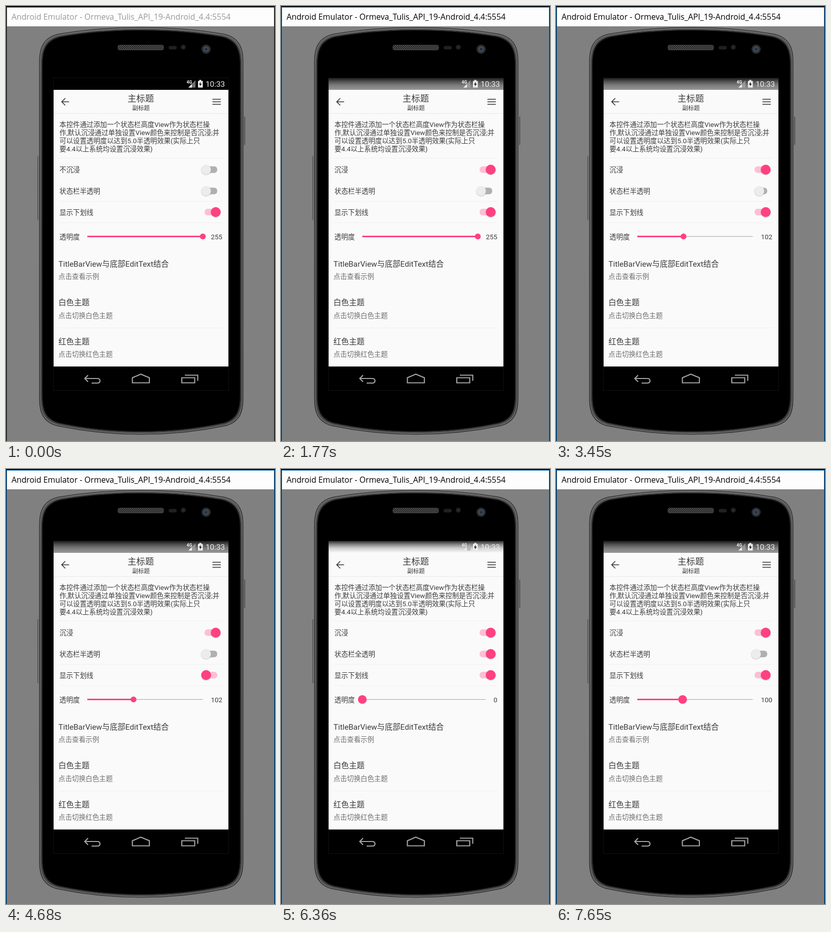
These frames come from a looping animation (531x856 px, 8 s). An HTML page:

```html
<!DOCTYPE html>
<html lang="zh-CN">
<head>
<meta charset="utf-8">
<style>
html, body { margin: 0; width: 100%; height: 100%; overflow: hidden; background: #808080; }
svg { display: block; width: 531px; height: 856px; }
text { font: 13.4px Roboto, 'Noto Sans CJK SC', 'Noto Sans CJK', sans-serif; fill: #3c3c3c; }
text.caption { font: 15.8px 'Open Sans', 'Noto Sans', sans-serif; }
text.item { font-size: 15.35px; fill: #3a3a3a; }
text.hint { fill: #707070; }
text.clock { font-size: 15.3px; fill: #eee; }
text.net { font-size: 8.5px; font-weight: 700; fill: #eee; }
text.mid { text-anchor: middle; }
text.end { text-anchor: end; }
</style>
</head>
<body>
<svg viewBox="0 0 531 856">
  <defs>
    <linearGradient id="shade" x1="0" y1="0" x2="0" y2="1">
      <stop offset="0" stop-opacity=".8"/>
      <stop offset=".3" stop-opacity=".45"/>
      <stop offset=".6" stop-opacity=".18"/>
      <stop offset="1" stop-opacity="0"/>
    </linearGradient>
    <linearGradient id="rim" x1="0" y1="0" x2="0" y2="1">
      <stop offset="0" stop-color="#5a5a5a"/>
      <stop offset=".12" stop-color="#444"/>
      <stop offset=".9" stop-color="#3c3c3c"/>
      <stop offset="1" stop-color="#4c4c4c"/>
    </linearGradient>
    <linearGradient id="key">
      <stop offset="0" stop-color="#3a3a3a"/>
      <stop offset=".45" stop-color="#8a8a8a"/>
      <stop offset="1" stop-color="#333"/>
    </linearGradient>
    <pattern id="mesh" width="4" height="4" patternUnits="userSpaceOnUse">
      <rect width="4" height="4" fill="#1c1c1c"/>
      <path d="M0 0L4 4M4 0L0 4" stroke="#666" stroke-width=".8"/>
    </pattern>
    <path id="body" d="M66 110C66 84 72 62 104 55Q180 42 267 42T430 55C462 62 468 84 468 110V770C468 796 464 818 434 826Q354 843 267 843T100 826C70 818 66 796 66 770Z"/>
  </defs>

  <rect width="531" height="856" fill="#0c0c0c"/>
  <rect x="1" y="2" width="529" height="854" fill="#808080"/>
  <rect x="1" y="2" width="529" height="38" fill="#fdfdfd"/>
  <path id="frame" d="M1.500 856V2.500H529.500V856" fill="none"/>
  <text id="caption" class="caption" x="11" y="27">Android Emulator - Ormeva_Tulis_API_19-Android_4.4:5554</text>

  <g id="phone">
    <rect x="62" y="295" width="5" height="127" rx="2" fill="url(#key)"/>
    <rect x="467" y="217" width="5" height="57" rx="2" fill="url(#key)"/>
    <use href="#body" fill="url(#rim)" stroke="#2a2a2a"/>
    <g id="layers"></g>
    <rect x="221" y="77" width="90" height="9.500" rx="3" fill="url(#mesh)" stroke="#484848"/>
    <rect x="321" y="78.500" width="16" height="7" rx="3.500" fill="#202020"/>
    <circle cx="350" cy="81" r="5" fill="#1e1e1e"/>
    <circle cx="350" cy="81" r="2.500" fill="#2b2b2b"/>
    <circle cx="395" cy="85" r="9" fill="#2c3034"/>
    <circle cx="395" cy="85" r="5.500" fill="#3e4a57"/>
    <circle cx="395" cy="85" r="2.500" fill="#222a35"/>
    <rect x="93.500" y="141.500" width="346" height="615" fill="#000" stroke="#111"/>
  </g>

  <rect x="94" y="142" width="345" height="567.400" fill="#fafafa"/>
  <rect id="tint" x="94" y="142" width="345" height="23"/>
  <rect id="fade" x="94" y="142" width="345" height="23" fill="url(#shade)"/>
  <text class="net" x="356.500" y="153">4G</text>
  <path d="M374 146V160.500H360Z" fill="#aaa" opacity=".65"/>
  <path d="M367 153.500V160.500H360Z" fill="#eee"/>
  <path d="M379 147.500H381.500V145.500H385.500V147.500H388.500V160.500H379Z" fill="#eee"/>
  <path d="M384.500 149L381 154.500H383.300L382.500 158.500L386.500 153H384Z" fill="#111"/>
  <text class="clock" x="394" y="159">10:33</text>

  <path d="M124.500 188.500H110.500M117 181.500L110 188.500L117 195.500" fill="none" stroke="#333" stroke-width="1.600"/>
  <path d="M407.500 183.500H424M407.500 188.500H424M407.500 193.500H424" stroke="#333" stroke-width="1.600"/>
  <path d="M94 211.500H439" stroke="#e8e8e8"/>
  <path d="M104 299.500H428M104 384.500H428M104 426.500H428M104 633.500H428" stroke="#f0f0f0"/>
  <g id="labels"></g>
  <g id="switches"></g>

  <path id="track" d="M160.500 453.500H388" stroke="#a3a3a3"/>
  <path id="filled" stroke="#ff4081" stroke-width="3"/>
  <circle id="knob" cy="453.500" fill="#ff4081"/>
  <text id="amount" class="end" x="427" y="458.500"></text>

  <g fill="none" stroke="#a2a2a2" stroke-width="2.200">
    <path d="M162 726.500L155.500 733L162 739.500M156 733H180Q185.500 733 185.500 737.500T180 742H169"/>
    <path d="M249.500 741.500V731.500L266 724.500L283 731.500V741.500Z"/>
    <path d="M347 731.500H372.500V741.500H347ZM353 726.500H378.500V737.500"/>
  </g>
</svg>
<script>
const LOOP = 8000;
const NS = 'http://www.w3.org/2000/svg';
const byId = id => document.getElementById(id);

function add(parent, tag, attrs, content = '') {
  const node = document.createElementNS(NS, tag);
  set(node, attrs);
  node.textContent = content;
  return byId(parent).appendChild(node);
}

function set(node, attrs) {
  for (const key in attrs) node.setAttribute(key, attrs[key]);
}

// Concentric layers of the phone shell, each inset by some pixels
function shell(inset, paint) {
  const sx = 1 - inset / 201, sy = 1 - inset / 400;
  add('layers', 'use', {
    href: '#body', ...paint,
    transform: `translate(267 442.5) scale(${sx} ${sy}) translate(-267 -442.5)`
  });
}
shell(1.8, { fill: 'none', stroke: '#777', 'stroke-width': 1.2 });
shell(4.6, { fill: '#000', stroke: '#4a4a4a', 'stroke-width': 1.2 });
shell(6, { fill: '#000', stroke: '#181818', 'stroke-width': 1.5 });

const label = (x, middle, content, cls = '') =>
  add('labels', 'text', { x, y: middle + 5, class: cls }, content);

label(266, 182.5, '主标题', 'mid').style.fontSize = '17.3px';
label(266.5, 200, '副标题', 'mid').style.fontSize = '11.5px';
[
  '本控件通过添加一个状态栏高度View作为状态栏操',
  '作,默认沉浸通过单独设置View颜色来控制是否沉浸;并',
  '可以设置透明度以达到5.0半透明效果(实际上只',
  '要4.4以上系统均设置沉浸效果)'
].forEach((line, i) => label(105.5, 233 + i * 16, line));
label(105.5, 453.5, '透明度');
[
  ['TitleBarView与底部EditText结合', '点击查看示例'],
  ['白色主题', '点击切换白色主题'],
  ['红色主题', '点击切换红色主题']
].forEach(([title, hint], i) => {
  label(103.5, 507.5 + i * 76.5, title, 'item');
  label(103.5, 532 + i * 76.5, hint, 'hint');
});

// Flips: [time, checked, duration of the thumb's slide]
function makeSwitch(y, offText, onText, initial, flips) {
  const text = label(105.5, y, '');
  const rail = add('switches', 'rect', { x: 392, y: y - 6.5, width: 25, height: 13, rx: 6 });
  const shadow = add('switches', 'circle', { cy: y + 0.8, r: 10.2, fill: '#000', opacity: 0.16 });
  const thumb = add('switches', 'circle', { cy: y, r: 9.7 });
  return time => {
    let on = initial, place = +initial;
    for (const [start, checked, span, ease = smooth] of flips) {
      if (time < start) break;
      on = checked;
      const p = ease(Math.min(1, (time - start) / span));
      place = checked ? p : 1 - p;
    }
    const cx = 395 + 19 * place;
    text.textContent = on ? onText : offText;
    set(rail, { fill: on ? '#fdbfd3' : '#b0b0b0' });
    set(thumb, { cx, fill: on ? '#ff4081' : '#ececec' });
    set(shadow, { cx });
  };
}

const smooth = p => (1 - Math.cos(Math.PI * p)) / 2;
const cubic = p => p * p * p;

const switches = [
  makeSwitch(322, '不沉浸', '沉浸', false, [[1530, true, 250]]),
  makeSwitch(364, '状态栏半透明', '状态栏全透明', false,
    [[2670, true, 270], [3300, false, 250], [6090, true, 250], [6540, false, 760, cubic]]),
  makeSwitch(405.5, '不显示下划线', '显示下划线', true, [[4080, false, 250], [4680, true, 250]])
];

const drag = [[5730, 102], [6090, 0], [6540, 0], [6720, 79], [7020, 108], [7320, 108], [7650, 100]];

function opacityAt(time) {
  if (time < 2670) return 255;
  if (time < 3300) return 0;
  if (time < drag[0][0]) return 102;
  for (let i = 1; i < drag.length; i++) {
    const [t0, v0] = drag[i - 1], [t1, v1] = drag[i];
    if (time < t1) return Math.round(v0 + (v1 - v0) * (time - t0) / (t1 - t0));
  }
  return drag[drag.length - 1][1];
}

function render(time) {
  const focused = time >= 1380, immersed = time >= 1530;
  byId('caption').style.fill = focused ? '#000' : '#999';
  set(byId('frame'), { stroke: focused ? '#0078d7' : '#444' });

  const value = opacityAt(time);
  const tint = !immersed ? 1 : time < 2670 ? 0.4 : value / 255;
  set(byId('tint'), { opacity: tint });
  set(byId('fade'), { opacity: +immersed });
  switches.forEach(update => update(time));

  // The track grows as the number beside it loses digits
  const right = 388.5 + 7.7 * (3 - String(value).length);
  const x = 160.5 + (right - 160.5) * value / 255;
  set(byId('track'), { d: `M160.5 453.5H${right}` });
  set(byId('filled'), { d: `M160.5 453.5H${x}` });
  set(byId('knob'), { cx: x, r: time >= 5730 ? 8.6 : 5.8 });
  byId('amount').textContent = value;
}

const begin = performance.now();
function tick() {
  render((performance.now() - begin) % LOOP);
  requestAnimationFrame(tick);
}
tick();
</script>
</body>
</html>
```
